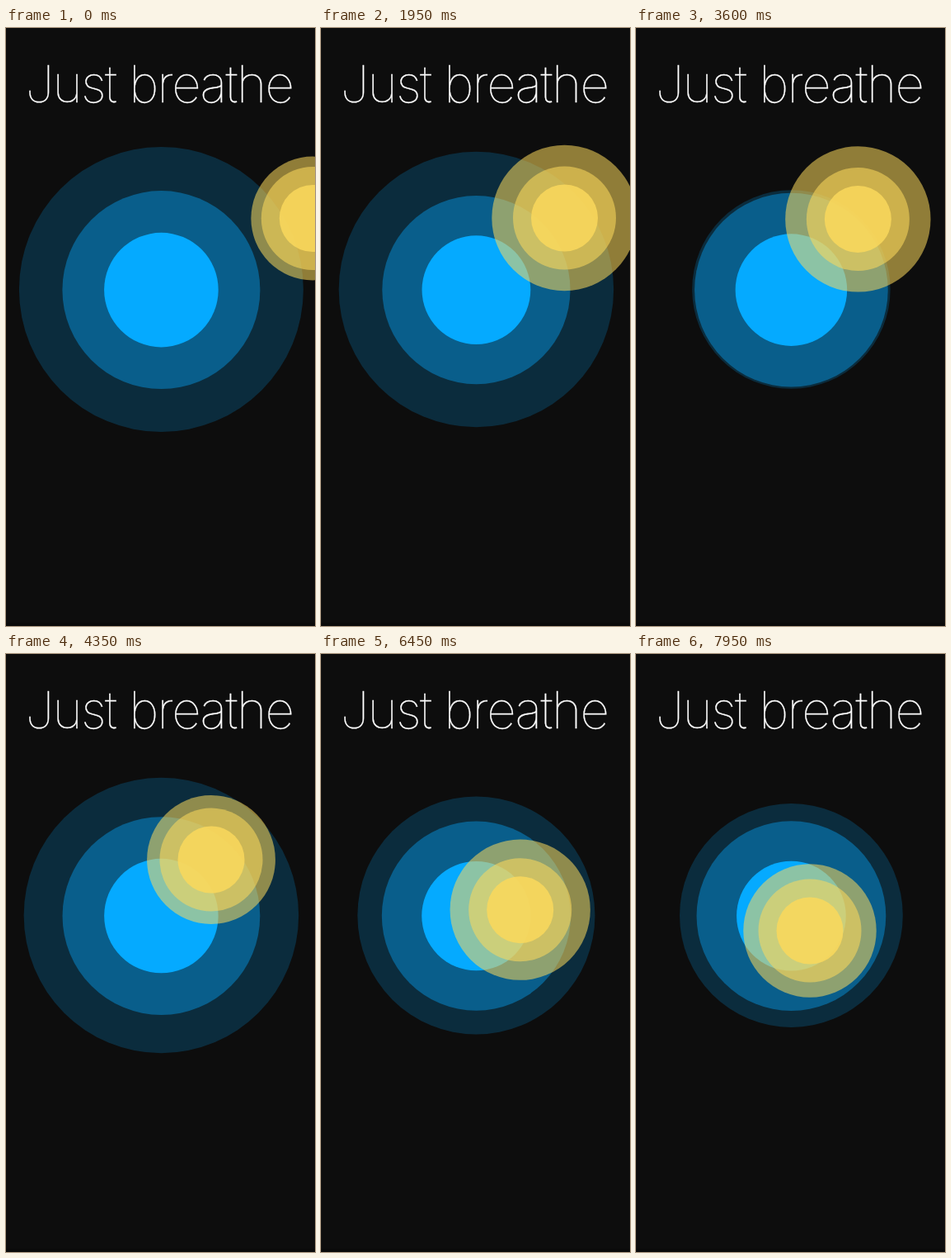
An HTML page for the animation above (8 s loop, 375x724 px).

```html
<!DOCTYPE html>
<html lang="en">
<head>
<meta charset="utf-8">
<title>Just breathe</title>
<style>
  html, body { margin: 0; width: 100%; height: 100%; overflow: hidden; background: #0d0d0d; }
  svg { display: block; width: 375px; height: 724px; }
  text {
    font: 100 62px Inter, Roboto, sans-serif;
    letter-spacing: -1.6px;
    text-anchor: middle;
    fill: #fff;
    stroke: #fff;
    stroke-width: .35px;
  }
  .blue { fill: #05aaff; }
  .gold { fill: #fbd95c; }
</style>
</head>
<body>
<svg viewBox="0 0 375 724">
  <rect width="375" height="724" fill="#0d0d0d"/>
  <rect y="720" width="375" height="4" fill="#0a0a0a"/>
  <text x="185.9" y="90">Just breathe</text>
  <g class="blue" transform="translate(188.4 316.5)">
    <circle id="blueOuter" opacity=".2"/>
    <circle id="blueMid" cy=".6" opacity=".4"/>
    <circle id="blueCore" cy=".6"/>
  </g>
  <g class="gold" id="gold">
    <circle id="goldOuter" opacity=".55"/>
    <circle r="62.5" opacity=".57"/>
    <circle r="40.5" opacity=".85"/>
  </g>
</svg>
<script>
const LOOP = 8000, STEP = 150;
const $ = id => document.getElementById(id);
const mix = (a, b, u) => a + (b - a) * u;
const smooth = u => u * u * (3 - 2 * u);
const easeInOut = (u, power) =>
  u < 0.5 ? (2 * u) ** power / 2 : 1 - (2 - 2 * u) ** power / 2;

// 0 at each peak, 1 halfway to the next one.
function fromPeak(t, period, peak) {
  const turn = (t - peak) / period;
  return 2 * Math.abs(turn - Math.round(turn));
}

// The gold disc is dragged from stop to stop: [time, x, y].
const stops = [
  [0, 372.3, 230.5], [1050, 302.5, 230], [2850, 288.5, 230], [3450, 271, 230],
  [4350, 249, 249], [5250, 252, 298], [6450, 241.7, 309.7], [7950, 211, 335]
];
function dragged(t) {
  const i = stops.findIndex(s => t <= s[0]) || 1;
  const [t0, x0, y0] = stops[i - 1], [t1, x1, y1] = stops[i];
  const u = smooth((t - t0) / (t1 - t0));
  return [mix(x0, x1, u), mix(y0, y1, u)];
}

function draw(t) {
  // The outer blue ring rests at its widest before it shrinks.
  const HOLD = 0.13;
  const shrink = Math.max(0, fromPeak(t, 2400, -50) - HOLD) / (1 - HOLD);
  $('blueOuter').setAttribute('r', mix(172.5, 120, easeInOut(shrink, 2)));

  const scale = mix(1, 0.95, easeInOut(fromPeak(t, 4800, -50), 3));
  $('blueMid').setAttribute('r', 120 * scale);
  $('blueCore').setAttribute('r', 69.3 * scale);

  const swell = (1 + Math.cos(Math.PI * fromPeak(t, 1368, 723))) / 2;
  $('goldOuter').setAttribute('r', mix(74.8, 89.7, swell));
  $('gold').setAttribute('transform', `translate(${dragged(t)})`);
}

let start;
function tick(now) {
  start ??= now;
  const t = (now - start) % LOOP;
  draw(Math.floor(t / STEP) * STEP);
  requestAnimationFrame(tick);
}
draw(0);
requestAnimationFrame(tick);
</script>
</body>
</html>
```
